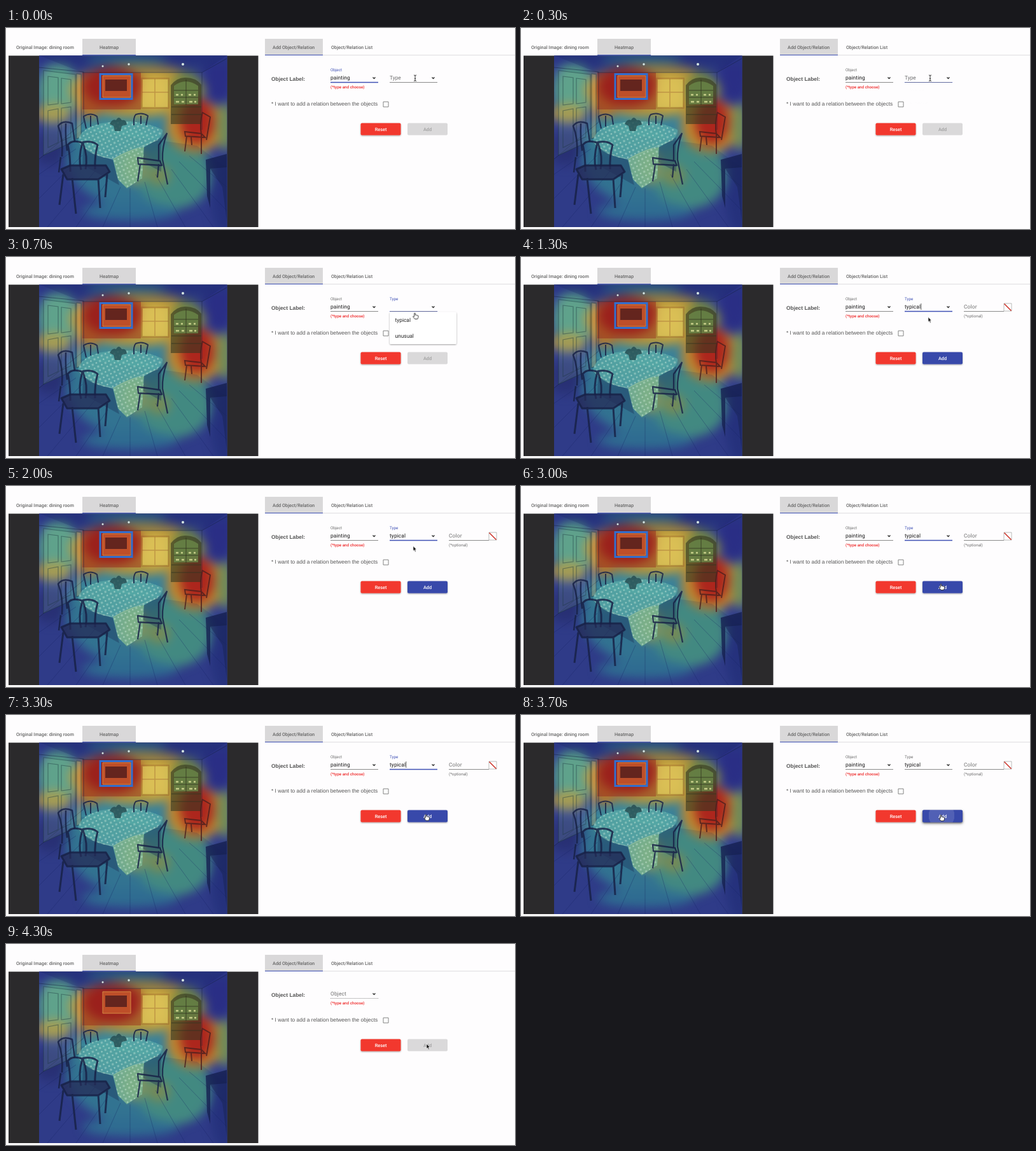
Write an HTML page that moves like this. It is 800 px wide and 316 px high and loops after 4400 ms.

```html
<!DOCTYPE html>
<html lang="en">
<head>
<meta charset="utf-8">
<title>Object labelling form</title>
<style>
html, body { margin: 0; width: 100%; height: 100%; overflow: hidden; background: #fefdfe; }
svg { display: block; width: 100%; height: 100%; }
text { font: 8.4px Roboto, sans-serif; fill: #6e6e6e; text-rendering: geometricPrecision; }
.tab { font-size: 7.35px; font-weight: 500; fill: #666; }
.plain { font-family: "Liberation Sans", sans-serif; fill: #555; }
.bold { font-weight: 700; }
.field { letter-spacing: .15px; }
.value { letter-spacing: .1px; fill: #161616; }
.small { font-size: 6.3px; }
.red { fill: #ee2a2a; font-weight: 500; }
.item { fill: #222; }
.button { font-size: 7.35px; font-weight: 500; text-anchor: middle; fill: #fff; }
.rule { stroke: #8b8b8b; stroke-width: 1; }
.focus { stroke: #3f51b5; stroke-width: 1.4; }
.dotted { stroke-width: 1; stroke-dasharray: 1 1; }
.chevron { fill: none; stroke: #333; stroke-width: 1.3; }
.soft { filter: blur(8px); }

[class*="t-"] { animation: 4.4s step-end infinite; }
.t-filled { animation-name: filled; }
.t-empty { animation-name: empty; }
.t-object { animation-name: object-focus; }
.t-object-label { animation-name: object-label; }
.t-type-label { animation-name: type-label; animation-timing-function: linear; }
.t-menu { animation-name: menu; animation-timing-function: linear; transform-origin: 655px 86px; }
.t-opened { animation-name: opened; }
.t-chosen { animation-name: chosen; }
.t-unchosen { animation-name: unchosen; }
.t-type-focus { animation-name: type-focus; }
.t-caret { animation-name: caret; }
.t-press { animation-name: press; }
.t-ripple { animation-name: ripple; animation-timing-function: linear; transform-origin: 661px 158px; }
.t-move { animation-name: move; animation-timing-function: ease-in-out; }
.t-beam { animation-name: beam; }
.t-hand { animation-name: hand; }
.t-arrow { animation-name: arrow; }

@keyframes filled { 0% { opacity: 1 } 90.91%, 100% { opacity: 0 } }
@keyframes empty { 0% { opacity: 0 } 90.91%, 100% { opacity: 1 } }
@keyframes object-focus { 0% { opacity: 1 } 6.82%, 100% { opacity: 0 } }
@keyframes object-label { 0% { fill: #3f51b5 } 6.82%, 100% { fill: #6e6e6e } }
@keyframes type-label {
  0%, 6.82% { transform: translate(603px, 81px); fill: #6e6e6e }
  9.1%, 77.26% { transform: translate(603px, 68px) scale(.75); fill: #3f51b5 }
  77.27%, 100% { transform: translate(603px, 68px) scale(.75); fill: #6e6e6e }
}
@keyframes menu {
  0%, 6.82% { opacity: 0; transform: scaleY(.8) }
  9.6%, 21% { opacity: 1; transform: none }
  22.73%, 100% { opacity: 0; transform: none }
}
@keyframes opened { 0% { opacity: 0 } 6.82% { opacity: 1 } 22.73%, 100% { opacity: 0 } }
@keyframes chosen { 0% { opacity: 0 } 22.73% { opacity: 1 } 90.91%, 100% { opacity: 0 } }
@keyframes unchosen { 0% { opacity: 1 } 22.73% { opacity: 0 } 90.91%, 100% { opacity: 1 } }
@keyframes type-focus { 0% { opacity: 0 } 22.73% { opacity: 1 } 77.27%, 100% { opacity: 0 } }
@keyframes caret {
  0% { opacity: 0 } 25% { opacity: 1 } 36.36% { opacity: 0 } 47.73% { opacity: 1 }
  59.09% { opacity: 0 } 70.45% { opacity: 1 } 77.27%, 100% { opacity: 0 }
}
@keyframes press { 0% { opacity: 0 } 77.27% { opacity: 1 } 90.91%, 100% { opacity: 0 } }
@keyframes ripple {
  0%, 77.27% { transform: scale(0); opacity: .13 }
  84.09% { transform: scale(.6); opacity: .13 }
  90.91%, 100% { transform: scale(1); opacity: 0 }
}
@keyframes move {
  0%, 6.82% { transform: translate(643px, 78px) }
  13.64%, 18% { transform: translate(643.5px, 88px) }
  22.73%, 54.55% { transform: translate(640px, 94.5px) }
  65.91%, 70% { transform: translate(661px, 154px) }
  77.27%, 99.99% { transform: translate(661px, 157px) }
  100% { transform: translate(643px, 78px) }
}
@keyframes beam { 0% { opacity: 1 } 9.09%, 100% { opacity: 0 } }
@keyframes hand { 0% { opacity: 0 } 9.09% { opacity: 1 } 22.73% { opacity: 0 } 63.64% { opacity: 1 } 90.91%, 100% { opacity: 0 } }
@keyframes arrow { 0% { opacity: 0 } 22.73% { opacity: 1 } 63.64% { opacity: 0 } 90.91%, 100% { opacity: 1 } }
</style>
</head>
<body>
<svg viewBox="0 0 800 316" preserveAspectRatio="none">
  <defs>
    <clipPath id="photo"><path d="M52 43.5H347.5V313H52z"/></clipPath>
    <clipPath id="cloth"><path d="M113 178Q116 158 150 150Q205 140 246 160Q247 168 238 176L217 187L214 236L190 252L176 238L168 206Q130 202 113 178z"/></clipPath>
    <clipPath id="add"><rect x="631" y="149.500" width="63" height="19" rx="2"/></clipPath>
    <pattern id="lace" width="9" height="9" patternUnits="userSpaceOnUse" patternTransform="rotate(18)">
      <path d="M2 0V4M0 2H4M6.500 5V8M5 6.500H8" stroke="#d9f2e2" stroke-width=".8"/>
    </pattern>
    <filter id="shadow" x="-20%" y="-30%" width="140%" height="170%">
      <feDropShadow dx="0" dy="1" stdDeviation="1.1" flood-opacity=".38"/>
    </filter>
    <filter id="lift" x="-20%" y="-40%" width="140%" height="210%">
      <feDropShadow dx="0" dy="2" stdDeviation="2" flood-opacity=".5"/>
    </filter>
    <path id="chevron" class="chevron" d="M-2 -1L0 1L2 -1"/>
  </defs>

  <!-- Tabs -->
  <path d="M120 17H204V43H120zM407 17H498V43H407z" fill="#d9d8d9"/>
  <path d="M407 42.700H800" stroke="#d5d4d6" stroke-width=".8"/>
  <path d="M120 42.500H204M407 42.500H498" stroke="#3f51b5"/>
  <text class="tab" x="16" y="32.600">Original Image: dining room</text>
  <text class="tab" x="147" y="32.600">Heatmap</text>
  <text class="tab" x="419" y="32.600">Add Object/Relation</text>
  <text class="tab" x="511" y="32.600">Object/Relation List</text>

  <!-- Dining room under a heatmap -->
  <path d="M4 43.500H396.500V313H4z" fill="#2b2a2c"/>
  <g clip-path="url(#photo)">
    <path d="M52 43H348V313H52z" fill="#34408f"/>
    <g class="soft">
      <ellipse cx="205" cy="195" rx="112" ry="88" fill="#37809a"/>
      <ellipse cx="265" cy="232" rx="58" ry="52" fill="#4a9a88"/>
      <ellipse cx="195" cy="288" rx="75" ry="14" fill="#34799a"/>
      <ellipse cx="82" cy="98" rx="32" ry="44" fill="#559a85"/>
      <ellipse cx="74" cy="134" rx="28" ry="15" fill="#a89443"/>
      <ellipse cx="206" cy="98" rx="107" ry="42" fill="#b8973a"/>
      <ellipse cx="132" cy="108" rx="24" ry="34" fill="#b6782d"/>
      <ellipse cx="168" cy="92" rx="46" ry="31" fill="#a42a20"/>
      <ellipse cx="234" cy="101" rx="24" ry="26" fill="#cfae45"/>
      <ellipse cx="284" cy="98" rx="25" ry="30" fill="#6f8443"/>
      <ellipse cx="298" cy="154" rx="46" ry="42" fill="#bd872f"/>
      <ellipse cx="300" cy="147" rx="27" ry="36" fill="#ad261d"/>
      <ellipse cx="175" cy="174" rx="62" ry="23" fill="#459a99"/>
      <ellipse cx="203" cy="219" rx="20" ry="28" fill="#8ba565"/>
      <ellipse cx="240" cy="232" rx="18" ry="16" fill="#849b57"/>
      <ellipse cx="345" cy="155" rx="14" ry="38" fill="#718b58"/>
      <ellipse cx="335" cy="70" rx="23" ry="48" fill="#2a2e85"/>
      <ellipse cx="344" cy="262" rx="22" ry="62" fill="#283582"/>
      <ellipse cx="70" cy="188" rx="28" ry="28" fill="#2c3479"/>
      <path d="M42 30H358V57H42z" fill="#293484"/>
      <ellipse cx="190" cy="49" rx="65" ry="8" fill="#2f6e8e"/>
    </g>

    <!-- Ceiling, walls and floor -->
    <path d="M52 43H347L308 70H120z" fill="#15205a" opacity=".22"/>
    <path d="M120 70H212V128H120z" fill="#8c1116" opacity=".38"/>
    <path d="M52 62L122 69V148L52 206M120 70H308V160M308 70L347 48" fill="none" stroke="#152043" stroke-opacity=".5"/>
    <path d="M52 205L120 160L300 185L347 220V313H52z" fill="#151d54" opacity=".13"/>
    <path d="M52 230L110 190M52 268L120 200M65 313L140 225M110 313L160 240M152 313L180 250M195 313V252M238 313L218 242M282 313L235 230M326 313L260 222M347 287L272 210M347 250L288 201" fill="none" stroke="#152060" stroke-opacity=".32"/>

    <!-- Doors, window and cabinet -->
    <g fill="none" stroke="#1b353f" stroke-opacity=".45" stroke-width="1.200">
      <path d="M59 67L109 73V177L59 200zM66 76L82 78V119L66 121zM87 79L102 81V117L87 119zM66 130L82 127V180L66 188zM87 126L102 124V171L87 178z" fill="#9bd1ae" fill-opacity=".15"/>
      <path d="M111 72L118 73V171L111 174z" fill="#e0c070" fill-opacity=".3"/>
    </g>
    <path d="M215 81H254V124H215z" fill="#e0c95e" opacity=".65"/>
    <path d="M213 79H256V126H213zM234 80V124M214 101H255" fill="none" stroke="#894824" stroke-opacity=".35" stroke-width="1.500"/>
    <path d="M259 90Q269 77 283 78Q298 78 307 89V151H259z" fill="#343821" opacity=".6"/>
    <path d="M264 91Q282 77 302 91V120H264z" fill="#6e8c4c" opacity=".72"/>
    <path d="M283 81V121M264 98H302M264 109H302M260 124H307M260 136H307" stroke="#30331f" stroke-opacity=".8"/>
    <path d="M267 105h4m4 0h3m9 0h4m4 0h3M267 116h5m4 0h4m8 0h5m3 0h3" stroke="#c5cd88" stroke-width="2.500"/>

    <!-- Picture on the wall -->
    <path d="M152 75H196V109H152z" fill="#be4f29" stroke="#d58a42"/>
    <path d="M156 81H190V99H156z" fill="#64251e"/>

    <!-- Table -->
    <path d="M121 188L168 208L178 247L120 215zM216 188L244 172V226L216 211z" fill="#172b50" opacity=".35"/>
    <g clip-path="url(#cloth)">
      <path d="M110 140H250V255H110z" fill="#5caeab" opacity=".65"/>
      <path d="M168 206Q190 191 217 187L214 236L190 252L176 238z" fill="#91bb80" opacity=".5"/>
      <path d="M110 140H250V255H110z" fill="url(#lace)" opacity=".6"/>
    </g>
    <path d="M113 179Q136 200 168 206Q200 190 239 176" fill="none" stroke="#d2e6c5" stroke-opacity=".35"/>
    <path d="M163 151q4-9 10-6q4-8 9 0q7-2 8 7l-8 2l-2 8h-9l-2-8z" fill="#254c51" opacity=".8"/>

    <!-- Chairs and desk -->
    <g fill="none" stroke="#172146" stroke-opacity=".83" stroke-width="3" stroke-linejoin="round">
      <path d="M101 226Q101 198 97 184Q103 175 119 180Q136 176 144 184Q139 202 140 222M120 181Q113 205 118 223M121 181Q129 202 125 222"/>
      <path d="M87 222L101 216H157L163 226L145 238H96zM90 230L84 278M104 236L110 292M145 237L148 283M159 230L156 266" fill="#252b57" fill-opacity=".75"/>
      <path d="M88 202Q90 174 82 154Q89 144 104 150L108 179M94 150Q93 173 96 193M86 203L83 227" stroke-width="2.500"/>
      <path d="M126 158L122 139Q133 132 143 139L145 152M133 138V155" stroke-width="2"/>
      <path d="M253 165Q245 188 246 207L254 246M252 167L240 184V210M207 204L242 209L245 216L208 214zM211 214L207 241M240 214L238 235" stroke-width="2.300"/>
      <path d="M201 153Q200 140 204 136Q214 132 223 138L220 153M212 138V151" stroke-width="2"/>
    </g>
    <g fill="none" stroke="#4d201d" stroke-opacity=".8" stroke-width="2">
      <path d="M309 132Q304 150 307 167V198M309 133L321 140L315 176M281 163L307 166L313 172L282 170zM284 170L281 194M291 171L292 184"/>
    </g>
    <path d="M314 207L347 198V219L321 221V283L316 264z" fill="#151f50" opacity=".78"/>
    <path d="M321 221L347 216V303L340 250z" fill="#192456" opacity=".5"/>
    <g fill="#d8e9e5">
      <circle cx="152" cy="60" r="1.500"/><circle cx="193" cy="57" r="1.700"/><circle cx="278" cy="57" r="2"/>
    </g>
  </g>
  <path class="t-filled" d="M148 72.500H198V111.500H148z" fill="none" stroke="#306fd0" stroke-width="3"/>

  <!-- Object field -->
  <text class="plain bold" x="417" y="82.500">Object Label:</text>
  <g class="t-filled">
    <text class="small t-object-label" x="510" y="68">Object</text>
    <text class="value" x="510" y="81">painting</text>
    <path class="rule" d="M510 85.500H585"/>
    <path class="focus t-object" d="M510 85.500H585"/>
  </g>
  <g class="t-empty">
    <text class="field" x="510" y="81">Object</text>
    <path class="rule dotted" d="M510 85.500H585"/>
  </g>
  <use href="#chevron" x="578.500" y="78.500"/>
  <text class="small red" x="510" y="95.300">(*type and choose)</text>

  <!-- Type field -->
  <g class="t-filled">
    <text class="t-type-label">Type</text>
    <path class="rule" d="M603 85.500H678"/>
    <path class="focus dotted t-opened" d="M603 85.500H678"/>
    <path class="focus t-type-focus" d="M603 85.500H678"/>
    <use href="#chevron" x="671.500" y="78.500"/>
  </g>
  <text class="value t-chosen" x="603" y="81">typical</text>
  <path class="t-caret" d="M628.800 73V83" stroke="#222" stroke-width=".7"/>

  <!-- Color field -->
  <g class="t-chosen">
    <text class="field" x="696" y="81">Color</text>
    <path class="rule" d="M696 85.500H759"/>
    <path d="M759 73H771V85H759z" fill="#fff" stroke="#aaa" stroke-width=".8"/>
    <path d="M759.500 73.500L770.500 84.500" stroke="#c92a20" stroke-width="1.400"/>
    <text class="small" x="696" y="95.300">(*optional)</text>
  </g>

  <!-- Relation and buttons -->
  <text class="plain" x="417" y="122.300">* I want to add a relation between the objects</text>
  <path d="M593 116H601V124H593z" fill="#fff" stroke="#777" stroke-width=".9"/>

  <rect x="557.500" y="149.500" width="63" height="19" rx="2" fill="#f2382f" filter="url(#shadow)"/>
  <text class="button" x="589" y="161.700">Reset</text>

  <g class="t-unchosen">
    <rect x="631" y="149.500" width="63" height="19" rx="2" fill="#dad9da"/>
    <text class="button" x="662.500" y="161.700" style="fill:#a0a0a0">Add</text>
  </g>
  <g class="t-chosen">
    <rect class="t-press" x="631" y="149.500" width="63" height="19" rx="2" fill="#3848aa" filter="url(#lift)"/>
    <rect x="631" y="149.500" width="63" height="19" rx="2" fill="#3848aa" filter="url(#shadow)"/>
    <g clip-path="url(#add)"><circle class="t-ripple" cx="661" cy="158" r="34" fill="#fff"/></g>
    <text class="button" x="662.500" y="161.700">Add</text>
  </g>

  <g class="t-menu">
    <rect x="603" y="86.500" width="105" height="50.500" rx="2" fill="#fff" filter="url(#shadow)"/>
    <text class="item" x="611.500" y="101.800">typical</text>
    <text class="item" x="611.500" y="127">unusual</text>
  </g>

  <!-- Pointer -->
  <g class="t-move">
    <path class="t-beam" d="M-2 -4Q0 -4 0 -2.500Q0 -4 2 -4M0 -2.500V4M-2 5.500Q0 5.500 0 4Q0 5.500 2 5.500M-1 1.500H1" fill="none" stroke="#222" stroke-width=".9"/>
    <path class="t-hand" d="M-1.800 5V.5Q-1 -.8 -.2 .5V3.200Q1 2.500 1.500 3.500Q2.700 2.900 3 4Q4.500 3.700 4.500 5V6.700L3.300 9.500H-1L-3.800 5.800Q-3.200 4.200 -1.800 5.500z" fill="#fff" stroke="#161616" stroke-width=".8"/>
    <path class="t-arrow" d="M0 0V7.500L1.700 6L3 9L4.300 8.400L3 5.500H5.300z" fill="#111" stroke="#fff" stroke-width=".6"/>
  </g>
</svg>
</body>
</html>
```
